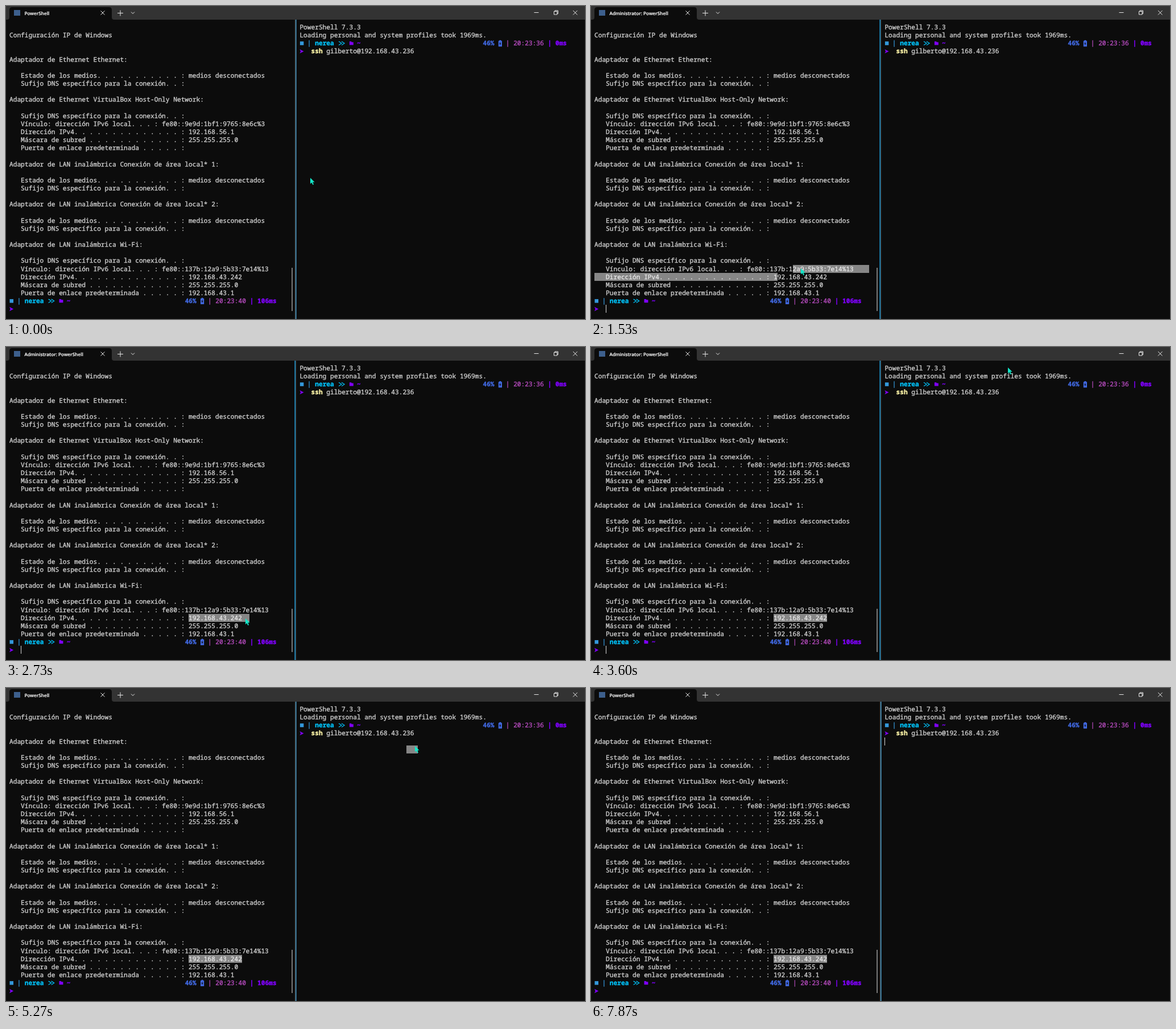
Animation of 1018 by 550 pixels, one loop 8000 ms. Source, as an HTML page:

```html
<!DOCTYPE html>
<html lang="es">
<head>
<meta charset="utf-8">
<style>
  html, body { margin: 0; width: 100%; height: 100%; overflow: hidden; background: #0c0c0c; }
  svg { display: block; width: 1018px; height: 550px; }
  text {
    font: 11.183px "Noto Sans Mono", "DejaVu Sans Mono", monospace; white-space: pre; text-rendering: geometricPrecision;
    color: #d0d0d0; fill: currentColor; stroke: currentColor; stroke-width: .35px;
  }
  #title { font: 600 8.2px "Open Sans", "Noto Sans", sans-serif; color: #fff; stroke-width: .2px; }
  .line { fill: none; stroke: #e6e6e6; }
</style>
</head>
<body>
<svg id="stage" viewBox="0 0 1018 550">
  <rect width="1018" height="550" fill="#0c0c0c"/>
  <rect width="1018" height="24" fill="#333"/>
  <path d="M2 24q4 0 4-4V7q0-5 5-5h170q5 0 5 5v13q0 4 4 4z" fill="#0c0c0c"/>
  <rect x="14" y="7" width="11" height="10" fill="#3d5f8c"/>
  <text id="title" x="32.5" y="15.5"></text>
  <path class="line" d="M166.5 8.5l7 7m0-7l-7 7M196 12.500h10M201 7.500v10M220 10.500l3 3 3-3M928.500 11.500h8M997 8l7.500 7.500m0-7.500l-7.500 7.500"/>
  <path class="line" d="M963.500 9.500h5.500v5.500h-5.500zM965 9.500v-1.500h5.500v5.500h-1.500"/>
  <rect id="leftEdge" x="507.500" y="24" width="1.500" height="526"/>
  <rect id="rightEdge" x="509" y="24" width="1.500" height="526"/>
  <rect x="502.300" y="460" width="1.500" height="76" fill="#9d9d9d"/>
  <g id="screen"></g>
  <g id="selection" fill="#fff" fill-opacity=".5"></g>
  <rect id="caret" width="1" fill="#d8d8d8"/>
  <path id="mouse" d="M0 0V10.500L2.500 8.300 4.300 12.200 6 11.400 4.300 7.600H7.600z" fill="#14e6c8"/>
</svg>
<script>
const $ = id => document.getElementById(id);
const CELL = 6.71, ROW = 14.15, TOP = 30, COLS = 72, LEFT = 6, RIGHT = 516.4;
const TICK = 1000 / 15, LOOP = 8000;
const BLUE = '#4169e1', PURPLE = '#8000ff', PINK = '#b84cc0', CYAN = '#00bff5', SKY = '#3498db';

function add(parent, tag, attrs, content = '') {
  const el = document.createElementNS('http://www.w3.org/2000/svg', tag);
  for (const k in attrs) el.setAttribute(k, attrs[k]);
  el.textContent = content;
  parent.append(el);
  return el;
}
const set = (el, attrs) => { for (const k in attrs) el.setAttribute(k, attrs[k]); };
const rowTop = row => Math.round(TOP + row * ROW);

function put(pane, col, row, str, color, weight = 400) {
  const el = add($('screen'), 'text', { x: pane + col * CELL, y: TOP + 11 + row * ROW }, str);
  if (color) el.style.color = color;
  el.style.fontWeight = weight;
}
function icon(pane, col, row, d, attrs) {
  add($('screen'), 'path', { d, transform: `translate(${pane + col * CELL} ${TOP + row * ROW})`, ...attrs });
}

function prompt(pane, row, col, time, took) {
  icon(pane, 0, row, 'M.5 4h6.500v6.500h-6.500z', { fill: SKY });
  put(pane, 2, row, '|', SKY);
  put(pane, 4, row, 'nerea', CYAN, 700);
  icon(pane, 10, row, 'M1.500 4l5 3.200-5 3.200M6.500 4l5 3.200-5 3.200', { fill: 'none', stroke: CYAN, 'stroke-width': 1.3 });
  icon(pane, 13, row, 'M.3 4h3l1 1.200h2.900v5h-6.900z', { fill: PURPLE });
  put(pane, 15, row, '~', PURPLE, 700);
  put(pane, col, row, '46%', BLUE, 700);
  icon(pane, col + 4, row, 'M.5 3h1.700v-1.300h2.800v1.300h1.700v10h-6.200zM3.900 4.500l-2 3.800h1.400l-.3 2.800 2.200-3.900h-1.500z', { fill: BLUE, 'fill-rule': 'evenodd' });
  put(pane, col + 6, row, '| ' + time, PINK);
  put(pane, col + 17, row, '| ' + took, PURPLE, 700);
  icon(pane, 0, row + 1, 'M0 3.500L7.200 7.200 0 10.900 1.800 7.200z', { fill: PURPLE });
}

// Dotted label lines of the ipconfig listing
const field = (label, value = '', end = 45) =>
  ('   ' + label + '. '.repeat(30)).slice(0, end) + ': ' + value;
const suffix = field('Sufijo DNS específico para la conexión');
const offline = name => [name, '', field('Estado de los medios', 'medios desconectados'), suffix, ''];
const online = (name, v6, v4, gate) => [
  name, '', suffix,
  field('Vínculo: dirección IPv6 local', v6, 38),
  field('Dirección IPv4', v4),
  field('Máscara de subred ', '255.255.255.0'),
  field('Puerta de enlace predeterminada ', gate), ''
];
[
  '', 'Configuración IP de Windows', '', '',
  ...offline('Adaptador de Ethernet Ethernet:'),
  ...online('Adaptador de Ethernet VirtualBox Host-Only Network:', 'fe80::9e9d:1bf1:9765:8e6c%3', '192.168.56.1', ''),
  ...offline('Adaptador de LAN inalámbrica Conexión de área local* 1:'),
  ...offline('Adaptador de LAN inalámbrica Conexión de área local* 2:'),
  ...online('Adaptador de LAN inalámbrica Wi-Fi:', 'fe80::137b:12a9:5b33:7e14%13', '192.168.43.242', '192.168.43.1')
].forEach((line, row) => line && put(LEFT, 0, row, line));
prompt(LEFT, 34, 46, '20:23:40', '106ms');

put(RIGHT, 0, 0, 'PowerShell 7.3.3');
put(RIGHT, 0, 1, 'Loading personal and system profiles took 1969ms.');
prompt(RIGHT, 2, 48, '20:23:36', '0ms');
put(RIGHT, 3, 3, 'ssh', '#f9f1a5', 700);
put(RIGHT, 7, 3, 'gilberto@192.168.43.236');

// Pointer stops: time, x, y
const stops = [
  [0, 535, 302], [870, 326, 473], [1270, 326, 472], [1530, 369, 461], [1800, 384, 463],
  [2000, 400, 475], [2330, 431, 478], [2470, 430, 478], [2730, 421, 477], [2870, 412, 476],
  [3070, 439, 479], [3330, 439, 479], [3600, 733, 36], [3870, 733, 36], [4270, 708, 105],
  [4930, 708, 105], [5130, 712, 112], [5470, 732, 86], [LOOP, 732, 86]
];
function pointer(t) {
  const i = stops.findIndex(s => s[0] > t);
  const [t0, x0, y0] = stops[i - 1], [t1, x1, y1] = stops[i];
  const p = (t - t0) / (t1 - t0), e = p * p * (3 - 2 * p);
  return [x0 + (x1 - x0) * e, y0 + (y1 - y0) * e];
}

function mark(pane, row, from, to) {
  add($('selection'), 'rect', {
    x: Math.round(pane + from * CELL), y: rowTop(row),
    width: Math.round((to - from) * CELL), height: rowTop(row + 1) - rowTop(row)
  });
}
function select(t, x, y) {
  $('selection').replaceChildren();
  const col = Math.floor((x - LEFT) / CELL);
  if (t >= 2800) mark(LEFT, 31, 47, 61);
  else if (t >= 1390) {
    if (y < TOP + 31 * ROW) {
      mark(LEFT, 30, col - 2, COLS);
      mark(LEFT, 31, 0, 48);
    } else mark(LEFT, 31, 47, col + 2);
  }
  if (t >= 5000 && t < 5790) {
    const c = Math.floor((x - RIGHT) / CELL);
    if (y < TOP + 5 * ROW) {
      mark(RIGHT, 4, c, COLS);
      mark(RIGHT, 5, 0, 29);
    } else mark(RIGHT, 5, 28, c + 1);
  }
}

// Each listed time toggles the caret
const blinks = [1330, 1870, 2470, 2930, 3470, 4000, 4530, 4670, 4730, 5270, 5800, 6330, 6870, 7470, 7800];

function draw(now) {
  const t = Math.floor((now % LOOP + 5) / TICK) * TICK % LOOP + 5;
  const leftFocus = t >= 1330 && t < 4730;
  const [x, y] = pointer(Math.min(t - 2, LOOP - 1));
  $('title').textContent = leftFocus ? 'Administrator: PowerShell' : 'PowerShell';
  set($('leftEdge'), { fill: leftFocus ? '#1f9bd8' : '#333' });
  set($('rightEdge'), { fill: leftFocus ? '#333' : '#4a9bc8' });
  set($('mouse'), { transform: `translate(${Math.round(x)} ${Math.round(y)})`, opacity: t < 7800 ? 1 : 0 });
  const [pane, col, row] = t < 4700 ? [LEFT, 3, 35] : t < 7870 ? [RIGHT, 30, 3] : [RIGHT, 0, 4];
  set($('caret'), {
    x: Math.round(pane + col * CELL), y: rowTop(row), height: rowTop(row + 1) - rowTop(row),
    opacity: blinks.filter(b => b <= t).length % 2
  });
  select(t, x, y);
}

function loop() {
  draw(performance.now());
  requestAnimationFrame(loop);
}
loop();
</script>
</body>
</html>
```
